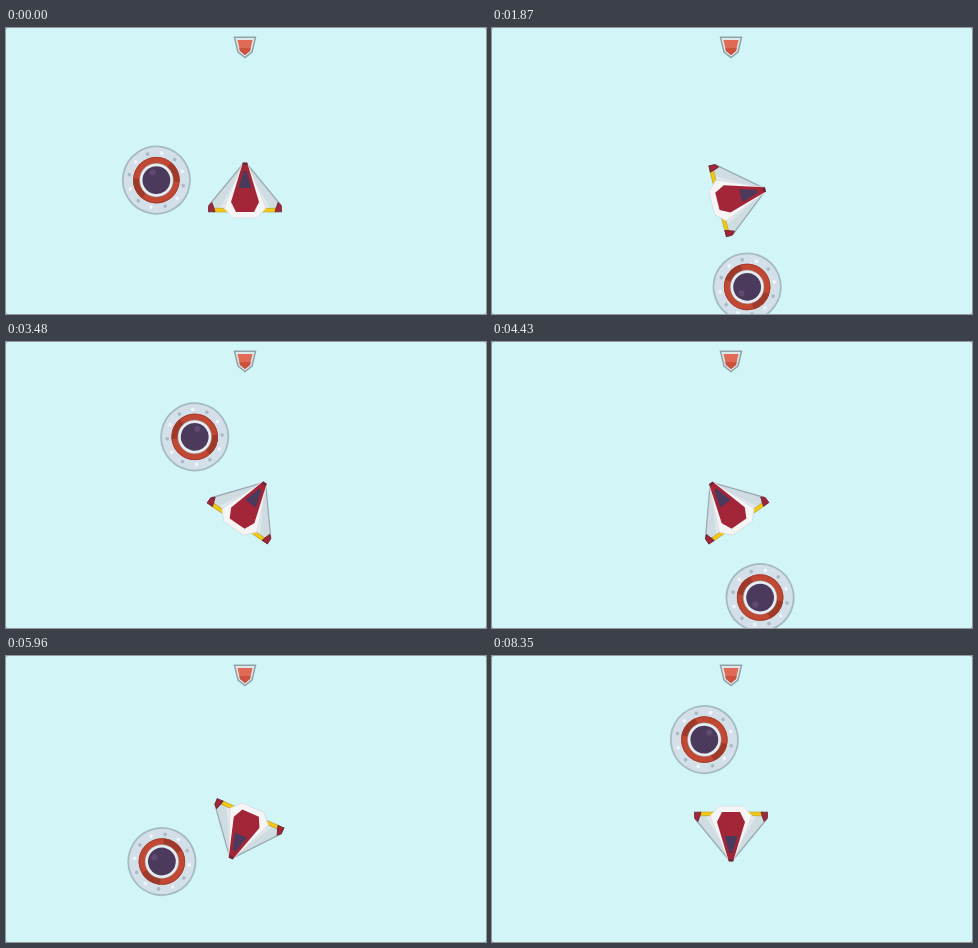
Write an HTML page that moves like this. It is 480 by 286 pixels and loops after 8.4 s.

```html
<!DOCTYPE html>
<html lang="en">
<head>
<meta charset="utf-8">
<title>Orbiting saucer</title>
<style>
  html, body { margin: 0; width: 100%; height: 100%; overflow: hidden; background: #93a9aa; }
  svg { display: block; width: 480px; height: 286px; }
</style>
</head>
<body>
<svg viewBox="0 0 480 286">
  <defs>
    <g id="wing">
      <path d="M2-34 L35 6 L29 12 H14 Z" fill="#cfdde3" stroke="#9babb2" stroke-width="1.3"/>
      <path d="M8-20 L25 10 H12 Z" fill="#dfe8ec"/>
      <path d="M15 10.3 H31 V14 H15 Z" fill="#f2c811" stroke="#b79a2c" stroke-width=".6"/>
      <path d="M33 4.6 L36.3 7.5 L36.5 13.8 H30 Z" fill="#a32638" stroke="#6d2734" stroke-width=".9"/>
    </g>
  </defs>

  <rect width="480" height="286" rx="2" fill="#d2f6f7"/>

  <g id="shield">
    <path d="M228.5 9.3 H249.5 L246 24 L239 29.6 L232 24 Z" fill="#dce7e9" stroke="#91a2a7" stroke-width="1.5"/>
    <path d="M231.5 12 H246.5 L244 23 L239 27 L234 23 Z" fill="#e16a56"/>
    <path d="M233.3 20 H244.7 L244 23 L239 27 L234 23 Z" fill="#cb523f"/>
  </g>

  <g transform="translate(239 170)">
    <g id="ship">
      <use href="#wing"/>
      <use href="#wing" transform="scale(-1 1)"/>
      <path d="M-2.5-35 H2.5 L21 10 L12 20 H-12 L-21 10 Z" fill="#f5f5f6" stroke="#d5dee2" stroke-width=".8"/>
      <path d="M-2.3-35 H2.3 L14 4 L9 14 H-9 L-14 4 Z" fill="#a32638"/>
      <path d="M-2.3-35.6 H2.3 V-33 H-2.3 Z" fill="#6d2734"/>
      <path d="M-1.5-27 H1.5 L6.5-10 H-6.5 Z" fill="#4c3a5d"/>
    </g>
    <g id="orbit">
      <g transform="translate(90.4 0)">
        <circle r="33.6" fill="#d3e0e9" stroke="#a6bac3" stroke-width="1.8"/>
        <g id="rivets"></g>
        <circle r="20" fill="none" stroke="#c14833" stroke-width="6.4"/>
        <circle r="20" fill="none" stroke="#9f3a2b" stroke-width="6.4" pathLength="360"
                stroke-dasharray="55 125" stroke-dashoffset="-118"/>
        <circle r="22.8" fill="none" stroke="#a13c2d" stroke-width=".8"/>
        <circle r="15.4" fill="#4c3a5d" stroke="#e6edf1" stroke-width="3"/>
        <circle r="17" fill="none" stroke="#9c6d68" stroke-width=".6"/>
        <circle cx="5.2" cy="6.7" r="3" fill="#5f4b72"/>
      </g>
    </g>
  </g>
</svg>
<script>
  const LOOP = 8400, STEP = 43.5, LAST = 192;
  const START = 191.4, SPIN = 100.4; // degrees, degrees per second

  // Ship heading: [ms, degrees clockwise from up]
  const turns = [
    [0, 0], [1580, 0], [1740, 39], [2570, 272], [2610, 276], [3400, 390],
    [3560, 396], [4430, 326], [5220, 224], [5700, 204], [6150, 203.6],
    [6960, 190.6], [7400, 180], [8400, 180]
  ];

  const secant = i => (turns[i + 1][1] - turns[i][1]) / (turns[i + 1][0] - turns[i][0]);

  // Harmonic mean keeps the curve from overshooting its points
  function slope(i) {
    if (i === 0 || i === turns.length - 1) return 0;
    const a = secant(i - 1), b = secant(i);
    return a * b > 0 ? 2 * a * b / (a + b) : 0;
  }

  function heading(t) {
    let i = 0;
    while (i < turns.length - 2 && t >= turns[i + 1][0]) i++;
    const [t0, a] = turns[i], [t1, b] = turns[i + 1];
    const span = t1 - t0, u = (t - t0) / span, v = 1 - u;
    return v * v * (1 + 2 * u) * a + u * u * (3 - 2 * u) * b
      + span * u * v * (v * slope(i) - u * slope(i + 1));
  }

  const byId = id => document.getElementById(id);
  const ship = byId('ship'), orbit = byId('orbit'), rivets = byId('rivets');

  for (let i = 0; i < 12; i++) {
    const dot = document.createElementNS('http://www.w3.org/2000/svg', 'circle');
    dot.setAttribute('cx', 27.5);
    dot.setAttribute('r', 1.8);
    dot.setAttribute('fill', i % 2 ? '#eff5f8' : '#a9bac5');
    dot.setAttribute('transform', `rotate(${i * 30})`);
    rivets.append(dot);
  }

  const begin = performance.now();

  function draw() {
    const clock = (performance.now() - begin) % LOOP;
    const t = Math.min(LAST, Math.floor((clock + 10) / STEP)) * STEP;
    const turn = heading(t);
    ship.setAttribute('transform', `rotate(${turn})`);
    orbit.setAttribute('transform', `rotate(${START - SPIN * t / 1000 + turn})`);
    requestAnimationFrame(draw);
  }
  draw();
</script>
</body>
</html>
```
